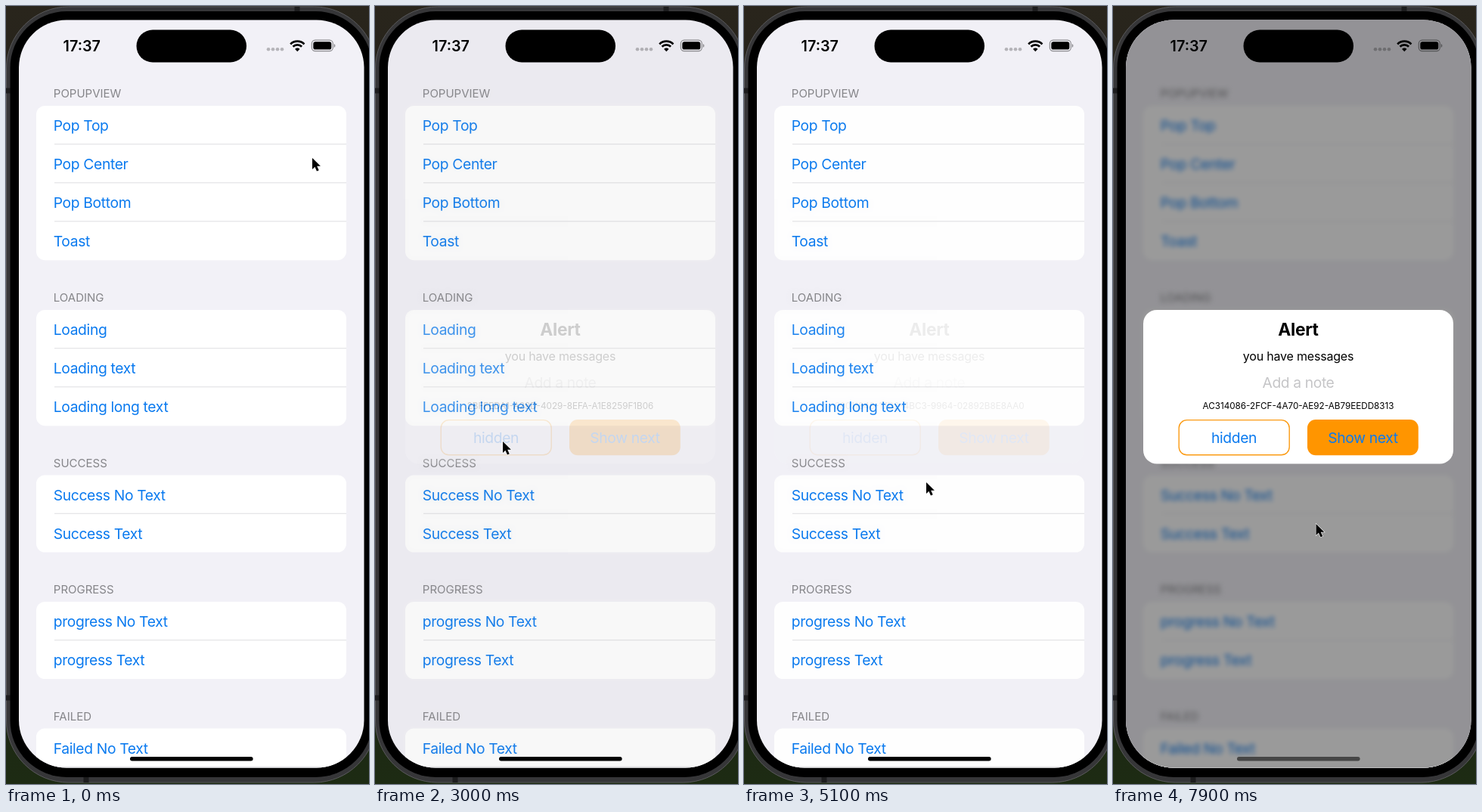
Write an HTML page that moves like this. It is 480x1029 px and loops after 8 s.

```html
<!DOCTYPE html>
<html lang="en">
<head>
<meta charset="utf-8">
<title>Popup demo</title>
<style>
html, body { margin: 0; width: 100%; height: 100%; overflow: hidden; background: #14170f; }
svg { display: block; width: 480px; height: 1029px; font-family: Inter, Roboto, "Liberation Sans", sans-serif; }
.row { font-size: 19.3px; letter-spacing: -.35px; fill: #0a7aef; }
.head { font-size: 15px; fill: #858589; }
.mid { text-anchor: middle; }
.blur { filter: blur(3.1px); }
</style>
</head>
<body>
<svg viewBox="0 0 480 1029">
  <defs>
    <clipPath id="screen"><rect x="17" y="18.5" width="456.5" height="989" rx="63"/></clipPath>
    <linearGradient id="scene" x2="0" y2="1">
      <stop offset="0" stop-color="#29251c"/>
      <stop offset=".5" stop-color="#1c1c1b"/>
      <stop offset="1" stop-color="#1d2b13"/>
    </linearGradient>
  </defs>

  <rect width="480" height="1029" fill="url(#scene)"/>
  <rect x=".5" y="1" width="489" height="1026" rx="82" fill="#363638" stroke="#59595b"/>
  <path d="M385 1v6M106 1020v7M0 112h6M0 915h6" stroke="#1d1d1e" stroke-width="7"/>
  <rect x="5.5" y="7" width="479" height="1013" rx="75"/>

  <g clip-path="url(#screen)">
    <rect width="480" height="1029" fill="#f2f1f7"/>
    <g id="list"></g>
    <g id="soft">
      <rect width="480" height="1029" fill="#f2f1f7"/>
      <g class="blur"><use href="#list"/></g>
    </g>
    <g id="status">
      <text class="mid" x="100.3" y="59.6" font-size="19.8" font-weight="600">17:37</text>
      <g opacity=".25">
        <circle cx="347" cy="57.3" r="2.3"/><circle cx="353" cy="57.3" r="2.3"/>
        <circle cx="359" cy="57.3" r="2.3"/><circle cx="365" cy="57.3" r="2.3"/>
      </g>
      <g fill="none" stroke="#000" stroke-width="2.8">
        <path d="M376.2 50.4a13 13 0 0 1 18.2 0M379.5 53.7a8.3 8.3 0 0 1 11.6 0"/>
      </g>
      <path d="M385.3 60.2l-3.2-3.3a4.6 4.6 0 0 1 6.4 0z"/>
      <rect x="404.3" y="45.2" width="28" height="14.4" rx="4.6" fill="none" stroke="#000" stroke-opacity=".42" stroke-width="1.2"/>
      <rect x="406.3" y="47.2" width="24" height="10.4" rx="2.9"/>
      <path d="M433.8 50v5c2-.8 2-4.2 0-5z" opacity=".45"/>
    </g>
    <rect id="dim" width="480" height="1029" opacity="0"/>
    <g id="popup" opacity="0">
      <rect x="40" y="402" width="410" height="203.5" rx="18" fill="#fff"/>
      <g class="mid">
        <text x="245" y="435.8" font-size="22.8" font-weight="700" letter-spacing="-.3">Alert</text>
        <text x="245" y="469" font-size="16" letter-spacing="-.2">you have messages</text>
        <text x="245" y="505" font-size="19.3" letter-spacing="-.4" fill="#c5c5c7">Add a note</text>
        <g font-size="11.7">
          <text id="oldId" x="245" y="533"></text>
          <text id="newId" x="245" y="533"></text>
        </g>
        <rect x="87.2" y="547.6" width="146" height="46.2" rx="10.5" fill="none" stroke="#fb9b14" stroke-width="1.4"/>
        <rect x="257" y="547" width="146.8" height="47.2" rx="11" fill="#ff9500"/>
        <text id="hide" class="row" x="160" y="578">hidden</text>
        <text id="next" class="row" x="330.5" y="578">Show next</text>
      </g>
    </g>
  </g>

  <rect x="172.5" y="31.5" width="145.5" height="43" rx="21.5"/>
  <rect id="home" x="164" y="993" width="162.6" height="5.4" rx="2.7"/>
  <path id="cursor" d="M0 0V15l3.4-3.2 2.6 5.7 2.7-1.2-2.5-5.5h4.7z" stroke="#fff" stroke-width="1.1" paint-order="stroke"/>
</svg>

<script>
const LOOP = 8000, STEP = 100;
const HOLDS = [800, 2700, 4800, 6600];   // ticks that repeat the one before

const SECTIONS = [
  [132, "POPUPVIEW", ["Pop Top", "Pop Center", "Pop Bottom", "Toast"]],
  [402, "LOADING", ["Loading", "Loading text", "Loading long text"]],
  [620.5, "SUCCESS", ["Success No Text", "Success Text"]],
  [788, "PROGRESS", ["progress No Text", "progress Text"]],
  [955.5, "FAILED", ["Failed No Text", "Failed Text"]],
];
const ROW = 51.05;

// popup: opening start, closing start
const SHOWS = [[1100, 2750], [3800, 4820], [5900, Infinity]];
const FADE = 300;

const IDS = [
  [0, "2BFFEDA1-A29D-4029-8EFA-A1E8259F1B06"],
  [3700, "00011848-17D2-4BC3-9964-02892B8E8AA0"],
  [5800, "60F98661-6B30-4BA9-9E3E-DF1FD06EEEF2"],
  [6600, "6C8D3437-4E97-48B2-963A-5B21FC0E8E71"],
  [6930, "E07B52D9-90A4-4C1E-B7F3-28D6A94C03B5"],
  [7230, "39A6F0C2-D815-47E9-A0BC-F14E7723D98A"],
  [7480, "AC314086-2FCF-4A70-AE92-AB79EEDD8313"],
];
const NEXT_TAPS = IDS.slice(3).map(([at]) => at);

// time, x, y
const PATH = [
  [0, 405, 201], [700, 232, 212], [1000, 225, 213], [1700, 226, 215],
  [2400, 183, 588], [2600, 170, 576], [3000, 169, 576], [3600, 215, 214],
  [3950, 216, 214], [4500, 228, 562], [4700, 216, 694], [4900, 241, 630],
  [5150, 241, 630], [5700, 235, 214], [6050, 235, 214], [6500, 318, 557],
  [6700, 318.5, 558], [7600, 319, 559], [7900, 268.5, 685],
];

const $ = id => document.getElementById(id);
const clamp = v => Math.min(1, Math.max(0, v));
const smooth = v => v * v * (3 - 2 * v);
const ramp = (t, from, to) => clamp((t - from) / (to - from));
const fade = (id, v) => $(id).setAttribute("opacity", v.toFixed(3));

function buildList() {
  $("list").innerHTML = SECTIONS.map(([top, title, rows], s) => {
    const card = `<text class="head" x="62.8" y="${top - 10.7}">${title}</text>
      <rect x="40" y="${top}" width="410" height="${ROW * rows.length}" rx="11.5" fill="#fff"/>`;
    const press = s ? "" : `<rect id="press" x="40" y="${top + ROW}" width="410" height="${ROW}" fill="#d1d1d6" opacity="0"/>`;
    const lines = rows.map((label, i) => {
      const y = top + ROW * i;
      const rule = i ? `<path d="M64 ${y - .3}H450" stroke="#dedee1"/>` : "";
      return `${rule}<text class="row" x="62.7" y="${y + 33}">${label}</text>`;
    });
    return card + press + lines.join("");
  }).join("");
}

function popupState(t) {
  const show = SHOWS.findLast(([open]) => t >= open);
  if (!show) return { alpha: 0, shade: 0 };
  const [open, close] = show;
  if (t < close) {
    const p = smooth(ramp(t, open, open + FADE));
    return { alpha: p, shade: p };
  }
  const left = 1 - ramp(t, close, close + FADE);
  return { alpha: left, shade: smooth(left) };
}

// quick press, slow release
const tap = (t, at, hold, end) =>
  Math.min(ramp(t, at - 50, at), 1 - ramp(t, at + hold, at + end));
const tapAny = (t, times, hold, end) =>
  Math.max(...times.map(at => tap(t, at, hold, end)));

function cursorAt(t) {
  const i = PATH.findLastIndex(k => t >= k[0]);
  const a = PATH[i], b = PATH[i + 1] || a;
  const p = a === b ? 0 : smooth(ramp(t, a[0], b[0]));
  return [1, 2].map(k => a[k] + (b[k] - a[k]) * p);
}

function drawId(t) {
  const i = IDS.findLastIndex(([at]) => t >= at);
  const swap = NEXT_TAPS.includes(IDS[i][0]);
  const p = swap ? ramp(t, IDS[i][0], IDS[i][0] + FADE) : 1;
  $("oldId").textContent = swap ? IDS[i - 1][1] : "";
  $("newId").textContent = IDS[i][1];
  fade("oldId", 1 - p);
  fade("newId", p);
}

function draw(t) {
  const { alpha, shade } = popupState(t);
  fade("popup", alpha);
  fade("soft", shade);
  fade("dim", shade * .397);
  fade("press", tapAny(t, SHOWS.map(([open]) => open - 100), 150, 400));
  fade("hide", 1 - .6 * tap(t, 2650, 50, 300));
  fade("next", 1 - .55 * tapAny(t, NEXT_TAPS, 120, 300));
  drawId(t);
  const grey = Math.round(14 * shade + 56 * ramp(t, 6900, 7500));
  $("home").setAttribute("fill", `rgb(${grey},${grey},${grey})`);
  $("cursor").setAttribute("transform", `translate(${cursorAt(t)})`);
}

let shown = -1;
function tick() {
  let t = Math.floor((performance.now() - start) % LOOP / STEP) * STEP;
  if (HOLDS.includes(t)) t -= STEP;
  if (t !== shown) draw(shown = t);
  requestAnimationFrame(tick);
}

buildList();
const start = performance.now();
tick();
</script>
</body>
</html>
```
